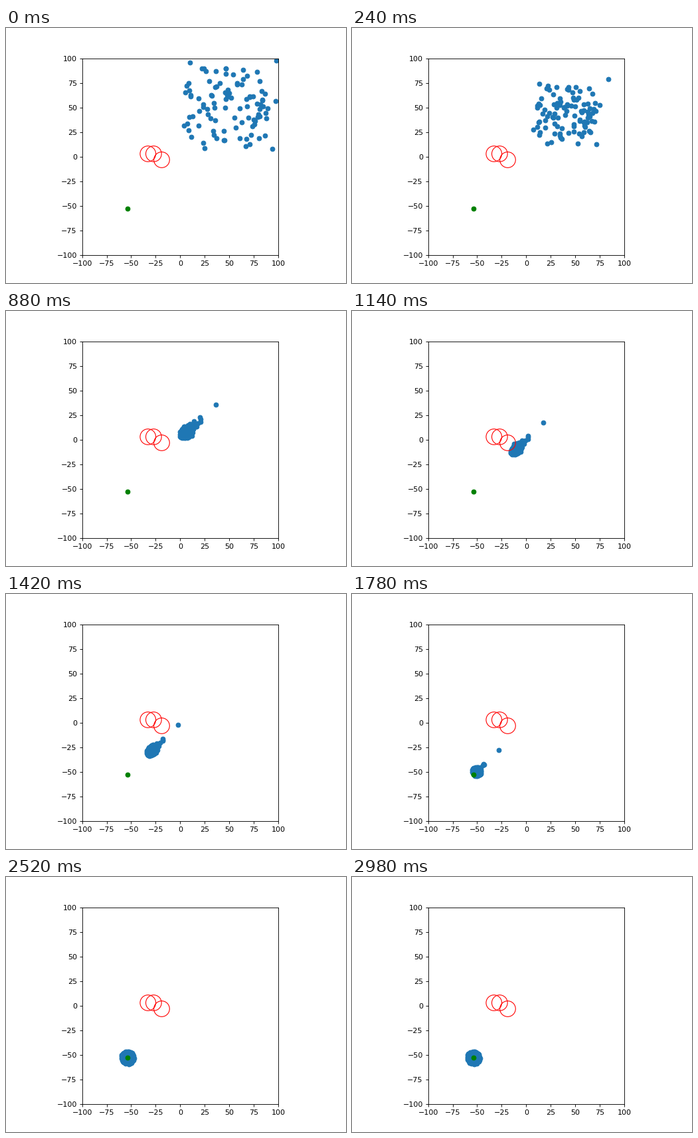
Animation of 512x384 px, one loop 3 s. Source, as a matplotlib script:

```python
import numpy as np
import matplotlib.pyplot as plt
from matplotlib.animation import FuncAnimation

FRAMES, INTERVAL = 150, 20
COUNT = 100
GOAL = np.array([-53.7, -53.0])
ROCKS = np.array([[-32.9, 3.0], [-27.1, 3.0], [-18.9, -3.1]])
SPIN = np.array([1, 1, -1])      # way round each rock: 1 is counter-clockwise
ROCK_R, WALL = 8, 7.5
MAX_SPEED = 2.0
KICK_TIME = 12


def start(rng):
    """A loose square cloud with a few agents at its rim; the first is a stray."""
    rim = [[98, 98], [94, 8], [10, 96], [7, 34], [25, 9], [97, 57]]
    u = rng.uniform(-1, 1, (3 * COUNT, 2))
    u = u[(np.abs(u) ** 3).sum(axis=1) < 1.2][:COUNT - len(rim)]
    return np.vstack([rim, (50, 52.5) + 43 * (u - u.mean(axis=0))])


def length(v):
    return np.linalg.norm(v, axis=-1, keepdims=True)


def dot(a, b):
    return (a * b).sum(axis=-1, keepdims=True)


def flock(p, t, kick):
    """Cohesion, separation and the pull of the goal, limited in speed."""
    pull = min(0.016 + 0.002 * t, 0.085)
    drive = min(0.8 + 0.033 * t, 1.95)
    to_goal = GOAL - p
    dist = length(to_goal)
    centre = np.where(dist < 15, GOAL, p.mean(axis=0))
    gap = p[:, None] - p[None]
    push = (gap / (dot(gap, gap) + 0.1)).sum(axis=1)
    v = pull * (centre - p + 48 / COUNT * push)
    v += drive * np.clip((dist - 7.5) / 5, 0, 1) * to_goal / np.maximum(dist, 1)
    v += kick * (t < KICK_TIME)
    return v * np.minimum(1, MAX_SPEED / np.maximum(length(v), 1e-9))


def slide(p, v):
    """Follow the wall of the nearest rock when heading into it."""
    rel = p[:, None] - ROCKS
    near = length(rel)[..., 0].argmin(axis=1)
    rel = rel[np.arange(len(p)), near]
    dist = length(rel)
    n = rel / dist
    along = SPIN[near][:, None] * np.column_stack([-n[:, 1], n[:, 0]])
    wall = along * np.clip(dot(v, along), 0.6, MAX_SPEED) + 0.2 * n * (WALL - dist)
    return np.where((dist < WALL) & (dot(v, n) < 0), wall, v)


def simulate():
    rng = np.random.default_rng(4)
    track = [start(rng)]
    kick = rng.normal(0, 0.2, (COUNT, 2))
    kick[0] = 0.4, -0.25
    for t in range(FRAMES - 1):
        p = track[-1]
        v = slide(p, flock(p, t, kick))
        track.append(p + v + rng.normal(0, 0.06, p.shape))
    return track


track = simulate()

fig, ax = plt.subplots(figsize=(6.4, 4.8), dpi=80)
ax.set(xlim=(-100, 100), ylim=(-100, 100), aspect="equal")
ticks = np.arange(-100, 101, 25)
ax.set_xticks(ticks)
ax.set_yticks(ticks)

swarm = ax.scatter(*track[0].T, color="tab:blue")
ax.scatter(-53.7, -52.8, color="green")
for rock in ROCKS:
    ax.add_patch(plt.Circle(rock, ROCK_R, color="red", fill=False))


def update(i):
    swarm.set_offsets(track[i])
    return swarm,


anim = FuncAnimation(fig, update, frames=FRAMES, interval=INTERVAL,
                     repeat=True, repeat_delay=0)
plt.show()
```
